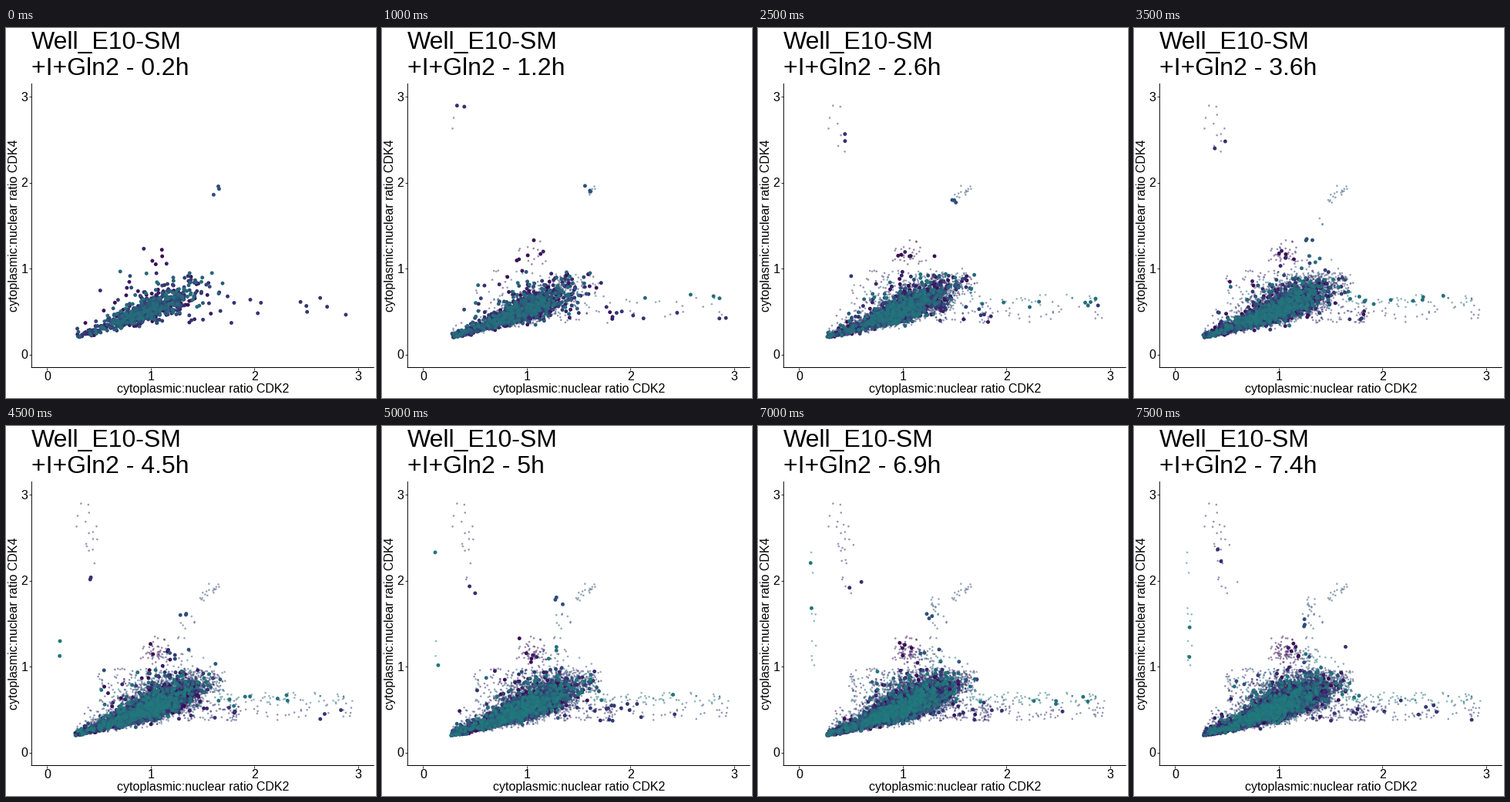
A matplotlib script that plays this animation: 480x480 px, repeating every 8 s.

```python
import numpy as np
import matplotlib.pyplot as plt
from matplotlib.animation import FuncAnimation
from matplotlib.colors import LinearSegmentedColormap

SIZE, DPI = 480, 96
STEPS, INTERVAL = 16, 500
PT = 72 / DPI
LIMITS = (-0.15, 3.15)

plt.rcParams["font.family"] = "Liberation Sans"
PALETTE = LinearSegmentedColormap.from_list(
    "cells", ["#3d064f", "#35286c", "#2f4a78", "#28667b", "#1f7a7b"])


def cloud(rng, n):
    """Main population: narrow at the lower left, fanning out to the right."""
    x = rng.normal(0.97, 0.23, n)
    tail = (rng.random(n) < 0.05) | (x < 0.3)
    x = np.where(tail, rng.uniform(0.27, 0.55, n), x)
    x = np.where(x > 1.62, rng.normal(1.1, 0.15, n), x)
    mid = 0.21 + 0.4 * (x - 0.28) + 0.04 * (x - 0.28) ** 2
    spread = np.clip(0.07 + 0.07 * x, 0.08, 0.14) * rng.normal(0, 1, n)
    skew = np.abs(rng.normal(0, 0.25, n)) * (rng.random(n) < 0.12)
    y = np.minimum(mid * np.exp(spread + skew), rng.uniform(0.78, 1.0, n))
    return x, np.maximum(y, 0.2 + 0.14 * (x - 0.27))


def right_band(rng, n):
    """Sparse cells far to the right, in an upper and a lower row."""
    x = 1.65 + 1.3 * rng.random(n) ** 1.2
    upper = rng.random(n) < 0.45
    y = np.where(upper, rng.normal(0.63, 0.045, n), rng.normal(0.48, 0.06, n))
    return x, np.clip(y, 0.38, 0.78), upper


def drift(k, keys):
    """Position on a path of (step, x, y) key points."""
    step, x, y = np.transpose(keys)
    return np.interp(k, step, x), np.interp(k, step, y)


def pair(rng, k, keys, n, dx, dy):
    x, y = drift(k, keys)
    return x + rng.uniform(-dx, dx, n), y + rng.uniform(-dy, dy, n)


HIGH = [(1, .30, 2.73), (2, .38, 2.83), (4, .42, 2.43), (6, .42, 2.7),
        (10, .48, 1.88), (12, .40, 2.66), (14, .54, 2.0), (15, .46, 2.31)]
STREAK = [(0, 1.63, 1.91), (2, 1.58, 1.92), (5, 1.49, 1.77), (7, 1.30, 1.33),
          (10, 1.31, 1.77), (12, 1.31, 1.74), (15, 1.24, 1.51)]


def population(k):
    rng = np.random.default_rng(100 + k)
    top = 0.86 + 0.14 * min(1, k / 10)
    groups = []

    def add(xy, v):
        x, y = xy
        groups.append(np.column_stack([x, y, np.broadcast_to(v, x.shape)]))

    def box(n, x0, x1, y0, y1):
        return rng.uniform(x0, x1, n), rng.uniform(y0, y1, n)

    n = 720 if k == 0 else 1000 + 30 * k
    add(cloud(rng, n), top * rng.random(n))

    # Halo above, shoulder and fringe to the right, dark clump on top.
    add(box(9, 0.48, 1.1, 0.6, 0.98), top * rng.random(9))
    add(box(12, 1.2, 1.72, 0.7, 0.95), top * rng.random(12))
    add(box(8, 1.25, 1.85, 0.37, 0.56), rng.uniform(0.1, 0.45, 8))
    add((rng.normal(1.07, 0.08, 6), rng.normal(1.17, 0.08, 6)),
        rng.uniform(0, 0.25, 6))
    if k > 5:
        add((rng.normal(1.3, 0.11, 5), rng.normal(1.1, 0.08, 5)),
            rng.uniform(0.3, top, 5))

    x, y, upper = right_band(rng, 11)
    add((x, y), np.where(upper & (k > 0), top - 0.08, 0.35))
    add(pair(rng, k, STREAK, 3, 0.04, 0.05), 0.55)
    if k > 0:
        add(pair(rng, k, HIGH, 2, 0.06, 0.1), 0.3)
    if k > 8:
        add(box(2, 0.11, 0.17, 0.8, 2.5), 0.98)

    cells = np.vstack(groups)
    return cells[np.argsort(cells[:, 2])]


data = [population(k) for k in range(STEPS)]

fig = plt.figure(figsize=(SIZE / DPI, SIZE / DPI), dpi=DPI, facecolor="white")
ax = fig.add_axes([33.3 / SIZE, 1 - 440.5 / SIZE, 443.8 / SIZE, 368 / SIZE])
ax.set(xlim=LIMITS, ylim=LIMITS, xticks=range(4), yticks=range(4))
ax.spines[["top", "right"]].set_visible(False)
for side in ("left", "bottom"):
    ax.spines[side].set(linewidth=PT, snap=False)
ax.tick_params(length=2.7 * PT, width=PT, color="#333333",
               labelleft=False, labelbottom=False)


def label(x, y, text, size=16, **kw):
    return fig.text(x / SIZE, 1 - y / SIZE, text, fontsize=size * PT,
                    **{"va": "baseline", **kw})


for i in range(4):
    label(53.5 + 134.5 * i, 457.3, str(i), ha="center")
    label(28.5, 429.3 - 111.5 * i, str(i), ha="right")
label(255.3, 473, "cytoplasmic:nuclear ratio CDK2", ha="center")
label(10.5, 256.7, "cytoplasmic:nuclear ratio CDK4", rotation=90,
      ha="center", va="center")
label(33.3, 27, "Well_E10-SM", 32)
clock = label(33.3, 61, "", 32)


def dots(diameter, alpha, z):
    return ax.scatter([], [], s=(diameter * PT) ** 2, alpha=alpha,
                      linewidths=0, zorder=z, cmap=PALETTE,
                      c=[], vmin=0, vmax=1)


trail = dots(2.6, 0.5, 2)
cells = dots(4.9, 1, 3)


def fill(artist, pts):
    artist.set_offsets(pts[:, :2])
    artist.set_array(pts[:, 2])


def draw(k):
    fill(trail, np.vstack([np.empty((0, 3))] + data[:k]))
    fill(cells, data[k])
    clock.set_text(f"+I+Gln2 - {round(0.2 + 0.48 * k, 1):g}h")
    return trail, cells, clock


anim = FuncAnimation(fig, draw, frames=STEPS, interval=INTERVAL,
                     repeat=True, repeat_delay=0, blit=False)
plt.show()
```
